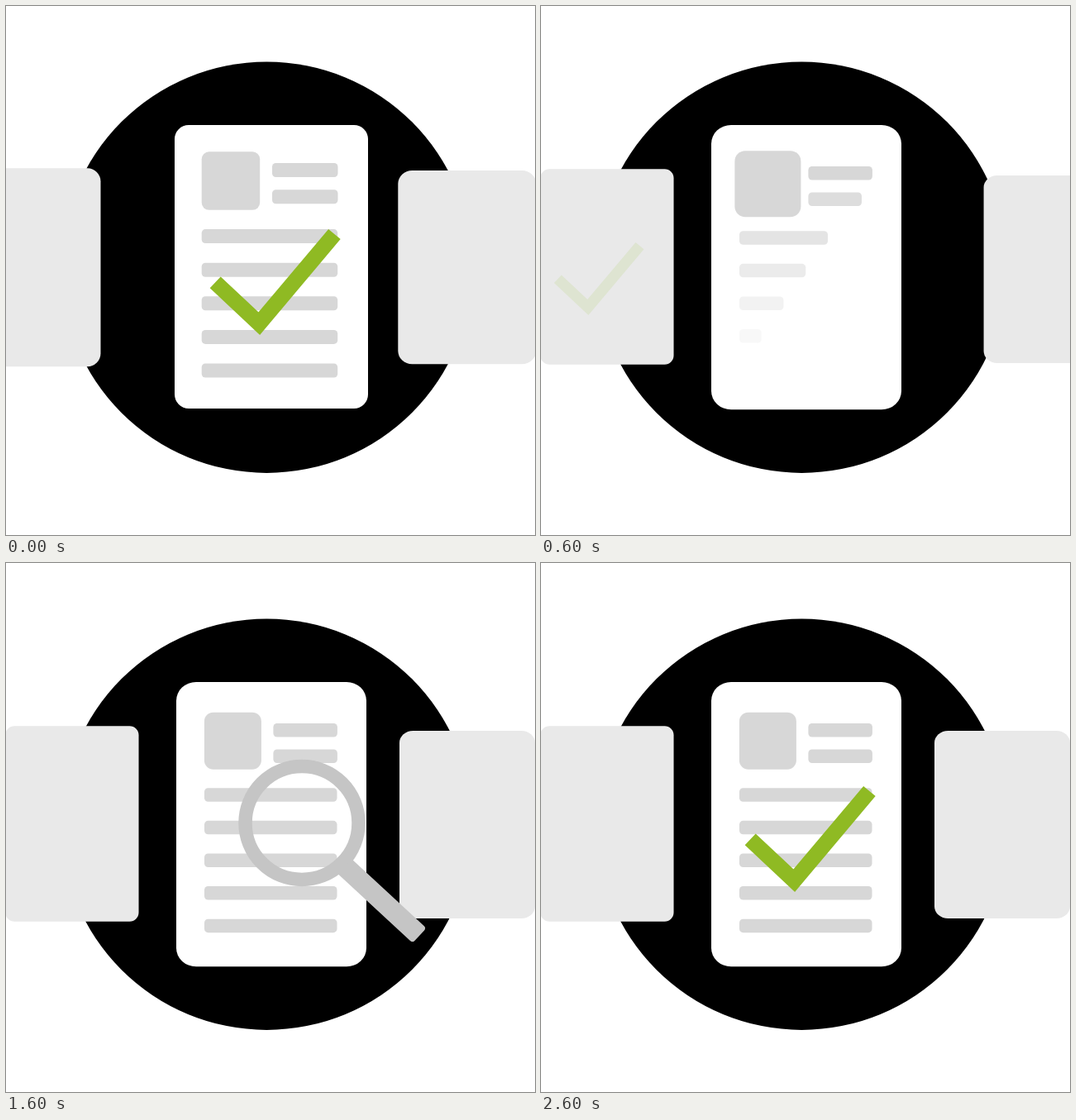
An HTML page with a canvas that plays this animation: 640x640 px, repeating every 2.9 s.

```html
<!DOCTYPE html>
<html lang="en">
<head>
<meta charset="utf-8">
<title>Document review</title>
<style>
  html, body { margin: 0; width: 100%; height: 100%; overflow: hidden; background: #fff; }
  canvas { display: block; width: 640px; height: 640px; }
</style>
</head>
<body>
<canvas id="stage" width="640" height="640"></canvas>
<script>
const ctx = document.getElementById('stage').getContext('2d');
const LOOP = 2900, STEP = 100;
const GREY = '#d7d7d7', GREEN = '#8fba23', LENS = '#c5c5c5';

const lerp = (a, b, p) => a + (b - a) * p;
const ramp = (t, from, to) => Math.min(1, Math.max(0, (t - from) / (to - from)));
const shade = v => `rgb(${v},${v},${v})`;
const bezier = (a, b, c, d, u) => {
  const v = 1 - u;
  return v * v * v * a + 3 * v * v * u * b + 3 * v * u * u * c + u * u * u * d;
};

function box(x, y, w, h, rx, fill, ry = rx) {
  ctx.fillStyle = fill;
  ctx.beginPath();
  ctx.roundRect(x, y, w, h, { x: Math.min(rx, w / 2), y: Math.min(ry, h / 2) });
  ctx.fill();
}

// Draws with the point (px, py) moved to (x, y) and scaled there
function placed(x, y, sx, sy, px, py, draw) {
  ctx.save();
  ctx.translate(x, y);
  ctx.scale(sx, sy);
  ctx.translate(-px, -py);
  draw();
  ctx.restore();
}

// Two short bars beside the photo, then five full lines
function drawBars(head, line, thick, grow) {
  for (let i = 0; i < 7; i++) {
    const g = i < 2 ? head : line, row = i < 2 ? i : i - 2;
    const part = grow(i);
    if (part <= 0) continue;
    ctx.save();
    ctx.globalAlpha *= part;
    box(g.x, g.y + g.gap * row, g.w * part, thick, 4.5, GREY);
    ctx.restore();
  }
}

function drawCheck(part, alpha) {
  if (part <= 0 || alpha <= 0) return;
  const length = 214.5;
  ctx.save();
  ctx.globalAlpha = alpha;
  ctx.strokeStyle = GREEN;
  ctx.lineWidth = 19;
  if (part < 1) ctx.setLineDash([part * length, length]);
  ctx.beginPath();
  ctx.moveTo(253.2, 334.3);
  ctx.lineTo(306.3, 384.2);
  ctx.lineTo(397.4, 276);
  ctx.stroke();
  ctx.restore();
}

function drawOldPage(t) {
  const move = ramp(t, 0, 480), shrink = ramp(t, 0, 520);
  const w = lerp(234, 161.3, shrink), h = lerp(343, 236.6, shrink);
  const x = lerp(321, 79.9, move);
  box(x - w / 2, 315.5 - h / 2, w, h, lerp(17, 11, shrink), shade(lerp(255, 233, move)));

  const ink = 1 - ramp(t, 200, 600), size = 1 - .00046 * t;
  if (ink > 0) placed(lerp(319, 80, move), 315.3, size, size, 319, 315.5, () => {
    ctx.globalAlpha = ink;
    box(236.7, 176.5, 70.5, 70.5, 9, GREY);
    drawBars({ x: 322, y: 190.2, w: 79.5, gap: 32.3 },
             { x: 236.7, y: 270.3, w: 164.5, gap: 40.6 }, 17, () => 1);
  });

  const s = lerp(1, .688, ramp(t, 0, 440));
  placed(lerp(325.75, 70.2, ramp(t, 0, 472)), lerp(334, 330, move), s, s, 325.75, 334,
    () => drawCheck(1, 1 - ramp(t, 160, 660)));
}

function drawNewPage(t) {
  const p = ramp(t, 120, 600);
  const x = lerp(474.3, 206, p), y = lerp(199, 144, p);
  const w = lerp(167, 230, p), h = lerp(234.3, 344.3, p);
  box(x, y, w, h, lerp(17, 24, p), shade(lerp(233, 255, p)), lerp(16, 22.5, p));

  placed(x + w / 2, y + h / 2, w / 230, h / 344.3, 321, 316.1, () => {
    const pop = 1.16 * ramp(t, 320, 600) - .16 * ramp(t, 600, 720), size = 69 * pop;
    if (pop > 0) box(274.4 - size / 2, 215.1 - size / 2, size, size, 11 * pop, GREY);
    drawBars({ x: 323.4, y: 194, w: 77.5, gap: 31.5 },
             { x: 240, y: 272.2, w: 160.5, gap: 39.6 }, 16.5,
             i => ramp(t, 360 + 40 * i, 600 + 40 * i));
  });
}

function drawNextCard(t) {
  const left = Math.pow(.006 * Math.max(0, 1251 - t), 3);
  box(476 + left, 202.9 + left * .034, 164, 227.1, 16.5, shade(233), 14.5);
}

// The magnifier sweeps in, swings round the text, then leaves at the lower right
const sweeps = [
  { from: 700, to: 1200, x: [400, 340, 270, 276], y: [378, 250, 211, 214] },
  { from: 1200, to: 1600, x: [276, 280, 385, 358], y: [214, 310, 386, 314.5] },
  { from: 1700, to: 2300, x: [358, 206, 316, 439], y: [314.5, 400, 462, 456] }
];

function drawLens(t) {
  const alpha = ramp(t, 620, 800) * (1 - ramp(t, 2200, 2400));
  if (t < sweeps[0].from || alpha <= 0) return;
  const s = sweeps.findLast(k => t >= k.from);
  const u = ramp(t, s.from, s.to);
  ctx.save();
  ctx.translate(bezier(...s.x, u), bezier(...s.y, u));
  ctx.globalAlpha = alpha;
  ctx.strokeStyle = ctx.fillStyle = LENS;
  ctx.lineWidth = 16.5;
  ctx.beginPath();
  ctx.arc(0, 0, 68.5, 0, Math.PI * 2);
  ctx.stroke();
  ctx.translate(54, 53.5);
  ctx.rotate(Math.atan2(82, 88.5));
  ctx.beginPath();
  ctx.roundRect(-2, -11.5, 123, 24.5, [0, 4, 4, 0]);
  ctx.fill();
  ctx.restore();
}

function render(t) {
  ctx.fillStyle = '#fff';
  ctx.fillRect(0, 0, 640, 640);
  ctx.fillStyle = '#000';
  ctx.beginPath();
  ctx.arc(315.4, 316.2, 248.7, 0, Math.PI * 2);
  ctx.fill();

  if (t < 400) box(-60 - t / 2, 196.3, 174.5, 240, 16, shade(233));
  drawNextCard(t);
  drawOldPage(t);
  drawNewPage(t);
  drawLens(t);
  drawCheck(ramp(t, 2300, 2560), 1);
}

const start = performance.now();
function tick() {
  const t = (performance.now() - start) % LOOP;
  render(Math.floor(t / STEP) * STEP);
  requestAnimationFrame(tick);
}
tick();
</script>
</body>
</html>
```
